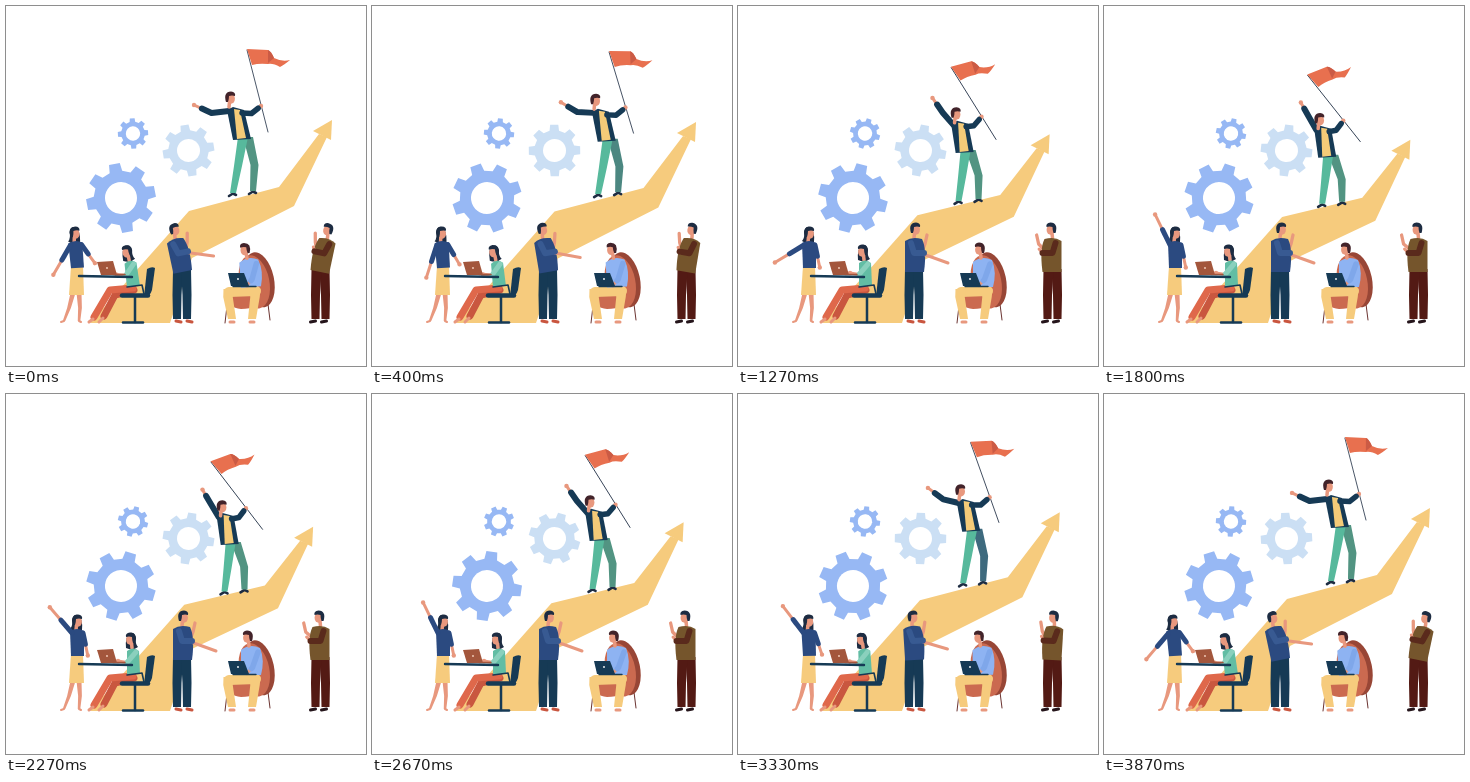
An HTML page that plays this animation: 360 by 360 pixels, repeating every 3940 ms.

```html
<!DOCTYPE html>
<html lang="en">
<head>
<meta charset="utf-8">
<title>Team success</title>
<style>
html, body { margin: 0; width: 100%; height: 100%; overflow: hidden; background: #fff; }
svg { display: block; width: 100vw; height: 100vh; }
</style>
</head>
<body>
<svg id="stage" viewBox="0 0 360 360"></svg>
<script>
const LOOP = 3940, STEPS = 59, TAU = Math.PI * 2;
const SKIN = '#e8987e', NAVY = '#163a55', BLUE = '#2b4a80', YELLOW = '#f6cb7d', HAIR = '#1d2c42',
      BROWN = '#42232a', CORAL = '#e8704f', ORANGE = '#df684b', SKY = '#97b8f4', TEAL = '#57b99c';
const stage = document.getElementById('stage');

// Drawing helpers: points are flat lists of x, y.
const poly = (fill, ...p) => `<polygon points="${p.join(' ')}" fill="${fill}"/>`;
const line = (color, width, ...p) => `<polyline points="${p.join(' ')}" fill="none" stroke="${color}"
  stroke-width="${width}" stroke-linejoin="round" stroke-linecap="round"/>`;
const oval = (fill, x, y, rx, ry = rx) => `<ellipse cx="${x}" cy="${y}" rx="${rx}" ry="${ry}" fill="${fill}"/>`;
const path = (fill, d) => `<path d="${d}" fill="${fill}"/>`;
const group = (transform, ...parts) => `<g transform="${transform}">${parts.join('')}</g>`;
const lerp = (a, b, k) => a + (b - a) * k;
const ease = x => { x = Math.max(0, Math.min(1, x)); return x * x * (3 - 2 * x); };

// A limb through three joints that narrows from one end to the other.
function taper(color, w0, w1, x0, y0, x1, y1, x2, y2) {
  const w = (w0 + w1) / 2;
  return poly(color, x0 - w0 / 2, y0, x1 - w / 2, y1, x2 - w1 / 2, y2, x2 + w1 / 2, y2, x1 + w / 2, y1, x0 + w0 / 2, y0);
}

// The joint halfway between two points, pushed aside by dx, dy.
const joint = (x0, y0, x1, y1, dx, dy) => [(x0 + x1) / 2 + dx, (y0 + y1) / 2 + dy];

// Sleeve and bare forearm from shoulder to hand, with an elbow that sags.
function arm(color, width, sx, sy, hx, hy, sag, sleeve) {
  const [ex, ey] = joint(sx, sy, hx, hy, 0, sag);
  const cx = lerp(ex, hx, sleeve), cy = lerp(ey, hy, sleeve);
  return line(SKIN, 3, cx, cy, hx, hy) + oval(SKIN, hx, hy, 2.2) + line(color, width, sx, sy, ex, ey, cx, cy);
}

function head(x, y, dir, hair, long = false) {
  return group(`translate(${x} ${y}) scale(${dir} 1)`,
    long ? path(hair, 'M-5-1Q-4-7 1-6Q6-3 5 9Q-2 12-7 8Q-4 5-5-1Z') : '',
    line(SKIN, 3.5, -.5, 4, -1, 9),
    oval(SKIN, 1, .8, 3.9, 5),
    path(hair, 'M-4 4Q-7-6 1-6.5Q6-6 5-2Q2-3-1-2Q-1 1-2 4Z'));
}

function gear(x, y, r, hole, fill, turn) {
  let d = '';
  for (let i = 0; i < 32; i++) {
    const raised = i % 4 === 1 || i % 4 === 2;
    const a = (Math.floor(i / 4) + [-.3, -.2, .2, .3][i % 4]) * TAU / 8;
    const d1 = raised ? r : r * .78;
    d += `${i ? 'L' : 'M'}${Math.sin(a) * d1} ${-Math.cos(a) * d1}`;
  }
  return group(`translate(${x} ${y}) rotate(${turn})`, path(fill, d + 'Z'), oval('#fff', 0, 0, hole));
}

function arrow(u) {
  const x = 326 - 20 * u, y = 114 + 20 * u;
  return poly(YELLOW, 84, 317, 183 - 5 * u, 205 + 6 * u, 273 - 15 * u, 181 + 11 * u,
      x - 13, y + 14, x - 5, y + 17, 288 - 17 * u, 200 + 15 * u, 186 - 2 * u, 252 + 4 * u, 164, 317) +
    poly(YELLOW, x, y, x - 19, y + 11, x - 1, y + 20);
}

function flag(x, y, turn) {
  return group(`translate(${x} ${y}) rotate(${turn})`,
    line(HAIR, .8, -14, -56, 7, 26),
    path(CORAL, 'M-14-57L7-56Q10-55 13-48Q21-44 29-46Q23-41 19-39Q12-43 7-42Q-2-43-9-41Z'),
    path('#cb5b45', 'M7-56Q10-55 13-48L7-43Z'));
}

function climber(u) {
  const nx = 230 - 11 * u, ny = 104 + 19 * u;
  const hx = 239 - 13 * u, hy = 133 + 18 * u;
  const handX = 188 + 9 * u, handY = 99 - 2 * u - 28 * u * (1 - u);
  const gripX = 255 - 16 * u, gripY = 100 + 15 * u;
  const leg = (color, hip, x, y, bend) => {
    const fx = x - 9 * u, fy = y + 11 * u;
    return line(HAIR, 2.6, fx - 4, fy + 3, fx, fy + .5, fx + 3, fy + 2) +
      taper(color, 10, 6, hip, hy - 2, ...joint(hip, hy, fx, fy, bend, 0), fx, fy);
  };
  const tint = Math.max(0, 1 - Math.abs(u - .35) / .3);
  const trouser = `rgb(${[[82, 45], [148, 70], [130, 122]].map(([a, b]) => Math.round(lerp(a, b, tint)))})`;
  return flag(gripX, gripY, -24.5 * u) +
    leg(trouser, hx + 3, 247, 185, 4) + leg(TEAL, hx - 2, 227, 187, 0) +
    arm(NAVY, 6, nx - 7, ny + 1, handX, handY, 5 * (1 - u), .55) +
    poly(NAVY, nx - 9, ny, nx - 3, ny - 3, nx + 8, ny, hx + 6, hy, hx - 12, hy + 1) +
    poly('#f4cb78', nx - 2, ny - 1, nx + 4, ny, hx + 1, hy - 1, hx - 8, hy) +
    arm(NAVY, 5.5, nx + 6, ny + 3, gripX, gripY, 4, .7) +
    head(nx - 6 + 2 * u, ny - 12 + 3 * u, 1, BROWN);
}

// Angle of the waving arm in degrees, outwards from hanging straight down.
function waveAngle(t) {
  const since = (t + LOOP - 950) % LOOP;
  const raise = ease(since / 850) * (1 - ease((since - 2300) / 870));
  return 21 + raise * (133 - 7.5 * (1 - Math.cos(TAU * (since - 850) / 870)));
}

function wavingWoman(t, lean) {
  const wave = waveAngle(t) * TAU / 360, rest = (12 + 20 * lean) * TAU / 360;
  return taper(SKIN, 5, 2.5, 67, 287, 63, 302, 58, 315) + taper(SKIN, 5, 2.5, 73, 287, 74, 302, 73, 315) +
    line(SKIN, 2, 58, 315, 55, 316) + line(SKIN, 2, 73, 315, 75, 316) +
    path(YELLOW, 'M65 260H77L78 289H63Z') +
    group(`rotate(${-4 * lean} 70 262)`,
      head(71, 227, 1, HAIR, true),
      arm(BLUE, 5, 77, 239, 77 + Math.sin(rest) * 23, 239 + Math.cos(rest) * 23, 0, -.2),
      path(BLUE, 'M64 237Q71 233 78 237L78 262H65Z'),
      arm(BLUE, 5, 66, 239, 66 - Math.sin(wave) * 34, 239 + Math.cos(wave) * 34, 0, -.3));
}

function deskWoman(lean) {
  return line(NAVY, 2.5, 129, 291, 129, 316) + line(NAVY, 2.5, 117, 316.5, 137, 316.5) +
    line('#c9573f', 7, 128, 284, 109, 289, 98, 310) + line(ORANGE, 7, 127, 282, 104, 284, 88, 311) +
    line(SKIN, 3, 87, 313, 83, 316) + line(SKIN, 3, 97, 312, 93, 316) +
    group(`rotate(${-6 * lean} 128 281)`,
      head(125, 245, -1, HAIR, true),
      path('#62bda4', 'M121 257Q127 252 133 257L134 280H121Z'),
      arm('#8ad0bd', 5, 130, 258, 112, 267, 6, 0)) +
    path(NAVY, 'M141 263Q146 260 149 262L146 284Q144 291 138 291Z') +
    line(NAVY, 4.5, 116, 289.5, 142, 289.5) + line(NAVY, 1.6, 121, 281, 136, 279, 138, 288) +
    path('#a3563c', 'M91 256L107 255L111 269H95Z') + oval('#f6d3c0', 101, 262, .9) +
    line('#a3563c', 1.5, 107, 268.5, 119, 268.5) + line(NAVY, 2.4, 73, 270, 126, 271);
}

// Drawn around the hips, facing right; dir -1 mirrors the figure.
function standingMan(x, dir, lean, look, reach, handX, handY) {
  return group(`translate(${x} 265) scale(${dir} 1)`,
    line(look.shoe, 3, -6, 50, -1, 51), line(look.shoe, 3, 5, 50, 10, 51),
    taper(look.trousers, 10, 8, -4, -2, -5, 24, -5, 48), taper(look.trousers, 10, 8, 4, -2, 5, 24, 5, 48),
    group(`rotate(${-12 * lean})`,
      line(SKIN, 3.3, 9, -22, 11 + reach, -27, 13 + reach, -36),
      head(1, -42, 1, look.hair),
      path(look.shirt, 'M-9-30Q-2-35 8-32Q13-22 10 1H-9Z'),
      line(SKIN, 3, 9, -17, handX, handY),
      line(look.sleeve, 6, -3, -28, 0, -18, 10, -18)));
}

function chairMan(lean) {
  const leg = (hip, knee, foot) => taper(YELLOW, 11, 8, hip, 283, knee, 291, foot, 313) +
    line(SKIN, 3, foot - 2, 316, foot + 2, 316);
  return line('#6b3330', 1, 221, 300, 219, 317) + line('#6b3330', 1, 262, 298, 264, 314) +
    group('rotate(-12 252 274)', oval('#984636', 253, 274, 15, 28), oval('#cb6a50', 248, 275, 15, 27)) +
    path('#cb6a50', 'M219 290Q235 282 258 289Q253 303 235 303Q222 302 219 290Z') +
    line(YELLOW, 10, 223, 286, 250, 285) + leg(249, 249, 246) + leg(223, 222, 226) +
    group(`rotate(${-4 * lean} 245 281)`,
      path('#8eb3f2', 'M235 256Q244 249 254 254Q259 266 255 281H235Z'),
      head(242, 243, -1, BROWN),
      arm('#7fa7ea', 5.5, 252, 258, 241, 279, 5, .2)) +
    path(NAVY, 'M222 267H238L243 280H225Z') + oval('#fff', 232, 273, .9) + line(NAVY, 1.4, 227, 280.5, 250, 280.5);
}

const TALKER = { shirt: BLUE, sleeve: '#385a92', trousers: NAVY, shoe: '#c9563f', hair: HAIR };
const CLAPPER = { shirt: '#75552c', sleeve: '#5a2a1c', trousers: '#531a14', shoe: '#25151b', hair: HAIR };

// Everything sways once per loop; the onlookers lean back only near the peak.
function render(t) {
  const u = (1 - Math.cos(TAU * t / LOOP)) / 2;
  const lean = 1 - ease(u / .33);
  const turn = 360 * t / LOOP;
  stage.innerHTML = arrow(u) +
    gear(115, 192, 35, 16, SKY, 34 + turn) +
    gear(127, 127.5, 15.3, 7.2, SKY, 42 - turn) +
    gear(182.5, 144.5, 26, 11.5, '#cbdff4', 36 - turn) +
    climber(u) + wavingWoman(t, lean) + deskWoman(lean) +
    standingMan(176, 1, lean, TALKER, 0, 34, -8) + chairMan(lean) +
    standingMan(314.5, -1, lean, CLAPPER, 4 * u, 12 + 2 * u, -22);
}

let start = null, shown = -1;
function tick(now) {
  start ??= now;
  const step = Math.floor(((now - start) % LOOP + 10) / LOOP * STEPS) % STEPS;
  if (step !== shown) render((shown = step) * LOOP / STEPS);
  requestAnimationFrame(tick);
}
render(0);
requestAnimationFrame(tick);
</script>
</body>
</html>
```
